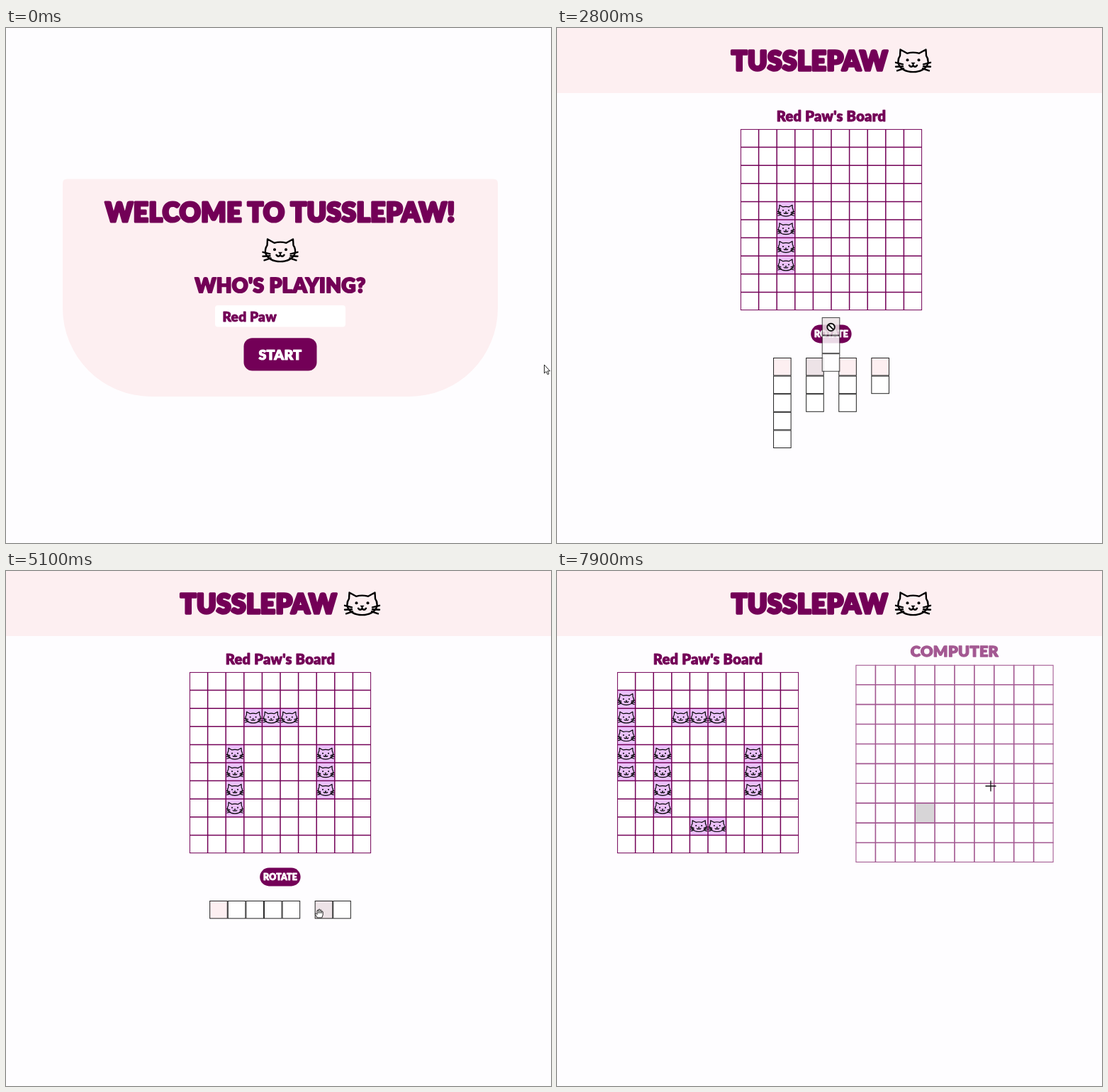
Recreate the animation shown at these times as an HTML page. Size 769 by 728 pixels, loop 8 s.

```html
<!DOCTYPE html>
<html lang="en">
<head>
<meta charset="utf-8">
<title>Tusslepaw</title>
<style>
  html, body { margin: 0; width: 100%; height: 100%; overflow: hidden; background: #fefdff; }
  svg { display: block; width: 769px; height: 728px; }
  text { font-family: Lato, sans-serif; font-weight: 900; letter-spacing: .015em; stroke-linejoin: round; }
</style>
</head>
<body>
<svg id="stage" viewBox="0 0 769 728"></svg>
<script>
const LOOP = 8000, FRAME = 100, CELL = 25.6, GAP = 20.5, MID = 387, TRAY_Y = 466;
const PLUM = '#730057', PINK = '#fdeff1', LILAC = '#ebc1fb', INK = '#222';
const stage = document.getElementById('stage');

// Pointer track: time, x, y
const track = [
  [100, 759.5, 476], [700, 388, 464], [800, 388, 464], [1300, 295, 478], [1400, 295, 478],
  [1900, 295, 467], [2200, 322, 247], [2300, 323, 259], [2700, 364, 480], [3000, 451, 260],
  [3200, 447, 322], [3500, 392, 436], [3600, 392, 436], [3800, 392, 479], [4000, 392, 479],
  [4400, 352, 187], [4600, 341, 206], [5100, 442, 484], [5200, 442, 484], [5600, 367, 366],
  [5800, 367, 369], [6000, 372, 434], [6100, 371, 434], [6300, 350, 466], [6600, 385, 482.5],
  [6700, 385, 482.5], [7400, 269, 186], [7600, 270, 188], [7700, 385, 262], [7800, 519, 342],
  [7900, 612, 304]
];

// Each drag: which tray slot, when hovered, grabbed and dropped, and where
const drags = [
  { slot: 0, over: 1200, from: 1900, to: 2300, col: 2, row: 4, upright: true },
  { slot: 1, over: 2600, from: 2700, to: 3100, col: 7, row: 4, upright: true },
  { slot: 1, over: 3700, from: 4000, to: 4700, col: 3, row: 2, upright: false },
  { slot: 1, over: 5000, from: 5200, to: 5700, col: 4, row: 8, upright: false },
  { slot: 0, over: 6600, from: 6700, to: 7600, col: 0, row: 1, upright: true }
];

const clamp = v => Math.max(0, Math.min(1, v));
const smooth = v => v * v * (3 - 2 * v);
const group = (transform, body, opacity = 1) =>
  `<g transform="${transform}" opacity="${opacity}">${body}</g>`;
const fade = (opacity, body) => `<g opacity="${opacity}">${body}</g>`;
const rect = (x, y, w, h, fill, extra = '') =>
  `<rect x="${x}" y="${y}" width="${w}" height="${h}" fill="${fill}" ${extra}/>`;
const grow = (x, y, s, body) =>
  group(`translate(${x} ${y}) scale(${s}) translate(${-x} ${-y})`, body);
const pulse = (t, a, b) => clamp((t - a) / 200) * clamp((b - t) / 200);

function label(str, x, y, size, weight, fill = PLUM, anchor = 'middle') {
  return `<text x="${x}" y="${y}" font-size="${size}" text-anchor="${anchor}" fill="${fill}"
    stroke="${fill}" stroke-width="${weight}">${str}</text>`;
}

function cat(x, y, s = 1) {
  const whiskers = '<path d="M-24.5 2.5L-14.5 5M-24.5 8.5L-14.5 8M-22.5 14L-13.5 11"/>';
  return group(`translate(${x} ${y}) scale(${s})`, `
    <g fill="none" stroke="#000" stroke-width="2.4" stroke-linecap="round" stroke-linejoin="round">
      <path d="M-21 3C-21.5 -2 -20 -5 -18.5 -7L-18 -15.8L-8.5 -10.5C-3 -12 3 -12 8.5 -10.5
        L18 -15.8L18.5 -7C20 -5 21.5 -2 21 3C19 12 9 15.8 0 15.8C-9 15.8 -19 12 -21 3Z"/>
      ${whiskers}<g transform="scale(-1 1)">${whiskers}</g>
      <path d="M-5.5 6.5q2.8 4 5.5 0q2.7 4 5.5 0"/>
    </g>
    <circle cx="-8" cy="-1" r="2"/><circle cx="8" cy="-1" r="2"/><path d="M-3 2.5H3L0 6.5Z"/>`);
}

function grid(x, y, filled = '') {
  const size = CELL * 10;
  let d = '';
  for (let i = 1; i < 10; i++) {
    d += `M${x + i * CELL} ${y}v${size}M${x} ${y + i * CELL}h${size}`;
  }
  return rect(x, y, size, size, '#fff') + filled +
    `<path d="${d}" stroke="${PLUM}" stroke-width="1.5"/>` +
    rect(x + 0.4, y + 0.4, size - 0.8, size - 0.8, 'none', `stroke="${PLUM}"`);
}

function piece(x, y, count, upright, head) {
  let out = '';
  for (let i = 0; i < count; i++) {
    out += rect(x + 0.5 + (upright ? 0 : i * CELL), y + 0.5 + (upright ? i * CELL : 0),
      CELL - 1, CELL - 1, i ? '#fff' : head, `stroke="${INK}"`);
  }
  return out;
}

function pointerAt(t) {
  const i = track.findIndex(k => k[0] > t);
  if (i === 0) return track[0].slice(1);
  if (i < 0) return track[track.length - 1].slice(1);
  const [t0, x0, y0] = track[i - 1], [t1, x1, y1] = track[i];
  const p = smooth((t - t0) / (t1 - t0));
  return [x0 + (x1 - x0) * p, y0 + (y1 - y0) * p];
}

function layTray(sizes, upright) {
  const span = n => CELL * (upright ? 1 : n);
  const total = sizes.reduce((sum, n) => sum + span(n), GAP * (sizes.length - 1));
  let x = MID - total / 2;
  return sizes.map(n => {
    const spot = { x, n };
    x += span(n) + GAP;
    return spot;
  });
}

const cursors = {
  arrow: '<path d="M0 0V12L2.7 9.6L4.7 13.8L6.5 13L4.6 8.9H8Z"/>',
  point: '<path d="M-1 0q1.3-1.5 2.6 0V5q4 0 6 2V11L6 15H0L-4 9q0-2 2-1L-1 9.5Z"/>',
  hand: '<path d="M-3 6L-5.5 1.5q-.8-2 1-1.5l1.5 1.5V-4q1-1.8 2 0V-5.3q1.1-1.5 2.1 0V-4.3q1.1-1.3 2.1 0V-2.3q1.1-1 2 0V2L3.8 6Z"/><path d="M-1 -4V0M1.1 -4V0M3.2 -3V0"/>',
  blocked: '<circle r="5.2" stroke-width="2"/><path d="M-3.7 -3.7L3.7 3.7" stroke-width="2"/>',
  cross: '<path d="M-7.5 0H7.5M0 -7.5V7.5" stroke-width="1.3"/>'
};
cursors.copy = cursors.arrow + '<path d="M6.5 12.5h7v7h-7ZM10 14v4M8 16h4"/>';

function cursor(t, x, y, drag) {
  let kind = 'arrow';
  const onRotate = Math.abs(x - MID) < 29 && Math.abs(y - 432) < 13;
  if (t < 900) kind = Math.abs(x - MID) < 51 && t >= 500 ? 'point' : 'arrow';
  else if (t >= 7800) kind = 'cross';
  else if (drag && t >= drag.from) kind = y > 399 ? 'blocked' : 'copy';
  else if (drag && t >= drag.over) kind = 'hand';
  else if (onRotate) kind = 'point';
  return group(`translate(${x} ${y})`,
    `<g fill="#fff" stroke="#111" stroke-width=".9" stroke-linejoin="round">${cursors[kind]}</g>`);
}

function welcome(t) {
  const button = rect(335.5, 438.2, 103, 46.2, PLUM, 'rx="12"') +
    label('START', MID, 469, 19.5, 1.1, '#fff');
  return `<path d="M86 213.5H688Q694 213.5 694 219.5V396A125 125 0 0 1 569 521H205A125 125 0 0 1 80 396V219.5Q80 213.5 86 213.5Z" fill="${PINK}"/>` +
    label('WELCOME TO TUSSLEPAW!', MID, 274, 36.8, 3.2) + cat(387, 314.3) +
    label('WHO\'S PLAYING?', MID, 374, 28, 2) +
    rect(295, 392, 184, 30.5, '#fff', 'rx="4"') +
    label('Red Paw', 305.5, 415, 19, 0.8, PLUM, 'start') +
    grow(MID, 461.5, 1 + 0.08 * clamp((t - 400) / 200), button);
}

function rival(t) {
  const p = clamp((t - 7600) / 300);
  const scale = 0.5 + 0.59 * (1 - (1 - p) ** 1.6);
  const hot = t >= 7800 ? rect(433 + 3 * CELL, 143 + 7 * CELL, CELL, CELL, '#c2c0c2') : '';
  const body = label('COMPUTER', 561, 132.5, 19.8, 1.2) + grid(433, 143, hot);
  return fade(clamp((t - 7500) / 620), grow(561, 256, scale, body));
}

function game(t, x, y) {
  const placing = t < 7600, left = placing ? 259 : 85, top = 143;
  const upright = t < 3600 || t >= 6200;
  const sizes = [4, 5, 3, 3, 2];
  let filled = '', ghost = '', drag = null;

  for (const d of drags) {
    if (t < d.to) { drag = d; break; }
    const [n] = sizes.splice(d.slot, 1);
    for (let i = 0; i < n; i++) {
      const cx = left + (d.col + (d.upright ? 0 : i)) * CELL;
      const cy = top + (d.row + (d.upright ? i : 0)) * CELL;
      filled += rect(cx, cy, CELL, CELL, LILAC) + cat(cx + CELL / 2, cy + CELL / 2, 0.5);
    }
  }

  let out = rect(0, 0, 769, 92, PINK) + label('TUSSLEPAW', 356.5, 60, 36.8, 3.4) +
    cat(502.5, 46.3) + label('Red Paw\'s Board', left + 128, 132, 20, 0.9) +
    grid(left, top, filled);

  if (placing) {
    const hover = Math.max(pulse(t, 3300, 3820), pulse(t, 5800, 6400));
    out += grow(MID, 432.5, 1 + 0.1 * hover,
      rect(358.2, 419.6, 57.4, 25.8, PLUM, 'rx="12.9"') + label('ROTATE', MID, 437, 12.3, 0.9, '#fff'));
    layTray(sizes, upright).forEach((spot, i) => {
      const active = drag && drag.slot === i && t >= drag.over;
      out += piece(spot.x, TRAY_Y, spot.n, upright, active ? '#ede3e7' : PINK);
      if (active && t > drag.from) {
        const [gx, gy] = pointerAt(drag.from);
        ghost = fade(0.85,
          piece(spot.x + x - gx, TRAY_Y + y - gy, spot.n, upright, '#ebe1e5'));
      }
    });
  } else {
    out += rival(t);
  }
  return fade(clamp((t - 800) / 500), out + ghost) + cursor(t, x, y, drag);
}

function draw(t) {
  const [x, y] = pointerAt(t);
  stage.innerHTML = t < 900 ? welcome(t) + cursor(t, x, y) : game(t, x, y);
}

let shown = -1;
const start = performance.now();
function tick() {
  const t = Math.floor(((performance.now() - start) % LOOP) / FRAME) * FRAME;
  if (t !== shown) draw(shown = t);
  requestAnimationFrame(tick);
}
tick();
</script>
</body>
</html>
```
